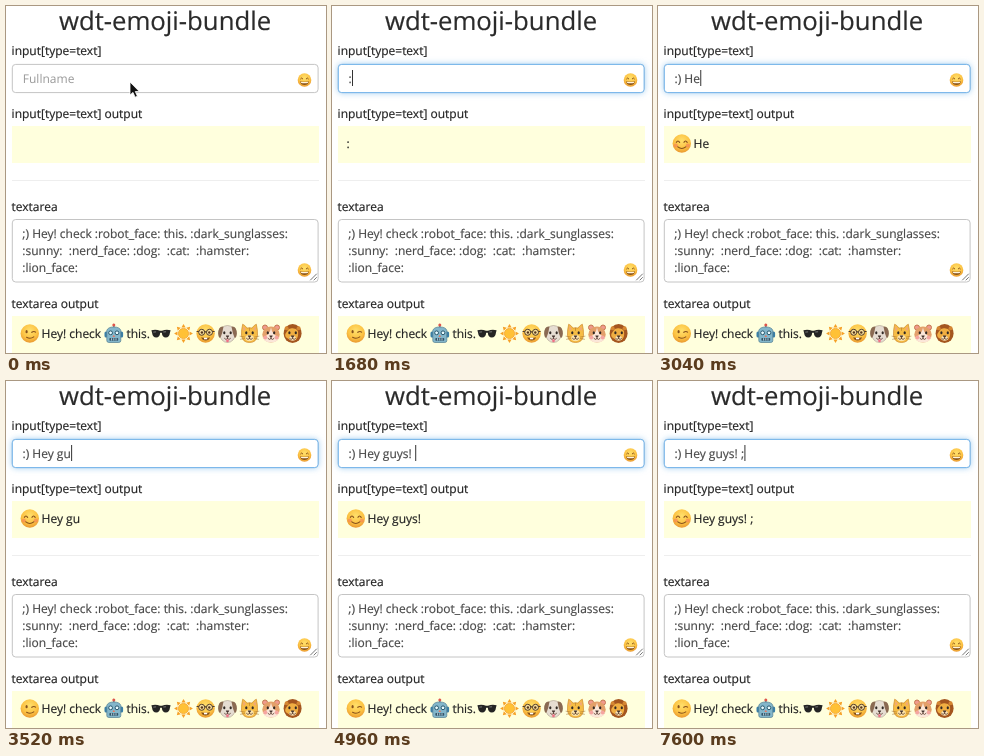
Recreate the animation shown at these times as an HTML page. Size 320 px wide and 347 px high, loop 8000 ms.

```html
<!DOCTYPE html>
<html lang="en">
<head>
<meta charset="utf-8">
<title>wdt-emoji-bundle</title>
<style>
  html, body { margin: 0; width: 100%; height: 100%; overflow: hidden; background: #fff; }
  svg { display: block; width: 100vw; height: 100vh; }
  text {
    font: 12px "Open Sans", sans-serif; text-rendering: geometricPrecision; white-space: pre;
    fill: #222; stroke: #222; stroke-width: .18px;
  }
  .title { font-size: 25.71px; fill: #2b2b2b; text-anchor: middle; }
  .field { fill: #fff; stroke: #c4c4c4; }
  .value { fill: #484848; stroke: #484848; }
  .line { fill: none; stroke-linecap: round; stroke-linejoin: round; }
  #placeholder { fill: #999; stroke: none; }
  #focus { fill: #fff; stroke: #74b4ea; filter: drop-shadow(0 0 3.4px rgba(102, 175, 233, .6)); }
</style>
</head>
<body>
<svg viewBox="0 0 320 347">
  <defs>
    <radialGradient id="skin" cx=".5" cy=".35" r=".7">
      <stop offset="0" stop-color="#ffe06c"/>
      <stop offset=".6" stop-color="#fcc243"/>
      <stop offset="1" stop-color="#e58f2c"/>
    </radialGradient>
    <!-- Emoji are centred on 0,0 and about 19 units wide -->
    <circle id="face" r="9.2" fill="url(#skin)"/>
    <g id="grin">
      <use href="#face"/>
      <path class="line" stroke="#8a5318" stroke-width="1.3" d="M-5.3-1.6q1.5-2.6 3 0M2.3-1.6q1.5-2.6 3 0"/>
      <path fill="#8a5318" d="M-6 1.6Q0 3 6 1.6Q5 6.8 0 6.8T-6 1.6Z"/>
      <path fill="#fff3dc" d="M-5.2 2.2Q0 3.4 5.2 2.2L4.4 4Q0 5-4.4 4Z"/>
    </g>
    <g id="blush">
      <use href="#face"/>
      <g fill="#f5795a" opacity=".55"><circle cx="-6" cy="2" r="2.1"/><circle cx="6" cy="2" r="2.1"/></g>
      <path class="line" stroke="#85501c" stroke-width="1.2" d="M-5.4-1.2q1.5-2.6 3.2 0M2.2-1.2q1.5-2.6 3.2 0M-4 3.4Q0 6.6 4 3.4"/>
    </g>
    <g id="wink">
      <use href="#face"/>
      <ellipse cx="-3.2" cy="-1.8" rx="1.1" ry="1.6" fill="#85501c"/>
      <path class="line" stroke="#85501c" stroke-width="1.1" d="M2-1.2Q4-2.8 5.8-1.4M-3.2 3.8Q.5 5.8 4 3.4"/>
    </g>
    <g id="robot">
      <path class="line" stroke="#5b8193" stroke-width="1.4" d="M0-9V-5"/>
      <circle cy="-8.4" r="1.5" fill="#e0554a"/>
      <rect x="-9.3" y="-2" width="18.6" height="6" rx="1.5" fill="#397ea6"/>
      <path fill="#83b6ca" stroke="#527f92" stroke-width=".7" d="M-7-3Q-6-6.5 0-6.5T7-3V7Q7 9 5 9H-5Q-7 9-7 7Z"/>
      <g fill="#e9fbff" stroke="#28576d"><circle cx="-3.2" cy="-.7" r="1.9"/><circle cx="3.2" cy="-.7" r="1.9"/></g>
      <path fill="#e57862" d="M0 1.2L1.3 3.4H-1.3Z"/>
      <rect x="-4.4" y="4.5" width="8.8" height="2.7" rx=".7" fill="#31546a"/>
      <path stroke="#d5edf3" stroke-width=".8" d="M-2.2 4.7v2.3M0 4.7v2.3M2.2 4.7v2.3"/>
    </g>
    <g id="shades">
      <path fill="#242424" d="M-9.6-3.2Q-5-4.3-1-2.7H1Q5-4.3 9.6-3.2L9-1Q8.4 4 4.8 4T.8-.7H-.8Q-1.2 4-4.8 4T-9-1Z"/>
      <path class="line" stroke="#777" d="M-7.3-1.4l2-.2M2.7-1.5l2-.2"/>
    </g>
    <g id="sun">
      <g id="rays" fill="#f6a026"></g>
      <circle r="5.1" fill="#ffc136" stroke="#f29a24" stroke-width=".7"/>
    </g>
    <g id="nerd">
      <use href="#face"/>
      <path fill="#85501c" d="M-4.4 3.8Q0 4.8 4.4 3.8Q3.4 7 0 7T-4.4 3.8Z"/>
      <path fill="#fff" d="M-1.6 4.2H1.6V5.8H-1.6Z"/>
      <g fill="#fbe3a0" stroke="#4f3a28"><circle cx="-3.9" cy="-1.2" r="3"/><circle cx="3.9" cy="-1.2" r="3"/></g>
      <path stroke="#4f3a28" stroke-width="1.2" d="M-9-2h2.2M6.8-2h2.2M-1-1.6h2"/>
      <g fill="#54351d"><circle cx="-3.7" cy="-1" r="1.2"/><circle cx="3.7" cy="-1" r="1.2"/></g>
    </g>
    <g id="eyes" fill="#302925"><ellipse cx="-3.2" cy="-.8" rx="1.1" ry="1.5"/><ellipse cx="3.2" cy="-.8" rx="1.1" ry="1.5"/></g>
    <g id="muzzle">
      <path class="line" stroke="#56382c" stroke-width=".8" d="M0 3V5M-3 5Q-1.5 7 0 5Q1.5 7 3 5"/>
      <path fill="#463631" d="M-1.7 2H1.7Q1.4 3.9 0 4Q-1.4 3.9-1.7 2Z"/>
    </g>
    <g id="dog">
      <ellipse cy=".5" rx="7.8" ry="8.5" fill="#e6ddd2" stroke="#a99b8b" stroke-width=".6"/>
      <path fill="#8a6a52" d="M-4-7Q-9-8-9.4 0Q-9 5-7 4Q-5 0-4-7ZM4-7Q9-8 9.4 0Q9 5 7 4Q5 0 4-7Z"/>
      <use href="#eyes"/><use href="#muzzle"/>
      <path fill="#ef7284" d="M-1.3 6H1.3V8Q0 9.4-1.3 8Z"/>
    </g>
    <g id="cat">
      <path fill="#f6bd45" stroke="#ce872b" stroke-width=".7" d="M-6.8-9.3Q-4-8-2.6-5.4Q0-6 2.6-5.4Q4-8 6.8-9.3Q8.2-4 8 2Q7 9 0 9T-8 2Q-8.2-4-6.8-9.3Z"/>
      <path fill="#f0a67c" d="M-6-7.2L-3.8-4.6L-6.4-2.6ZM6-7.2L3.8-4.6L6.4-2.6Z"/>
      <ellipse cy="4.5" rx="4.2" ry="3.1" fill="#fbe2a8"/>
      <use href="#eyes"/><use href="#muzzle"/>
      <path class="line" stroke="#9d6c2e" stroke-width=".5" d="M-5 3.5l-4.5-.8M-5 5l-4 .8M5 3.5l4.5-.8M5 5l4 .8M0-5.5v2.5"/>
    </g>
    <g id="hamster">
      <g fill="#f09a8c" stroke="#c57951"><circle cx="-6" cy="-6" r="2.5"/><circle cx="6" cy="-6" r="2.5"/></g>
      <ellipse cy="1" rx="8.7" ry="8" fill="#e3a06a"/>
      <path fill="#fbe6d8" d="M0-6Q1 1 8 4Q6.6 9 0 9T-8 4Q-1 1 0-6Z"/>
      <g fill="#f5a5a0"><circle cx="-5.7" cy="4" r="1.9"/><circle cx="5.7" cy="4" r="1.9"/></g>
      <use href="#eyes"/><use href="#muzzle"/>
    </g>
    <g id="lion">
      <ellipse rx="9" ry="9.4" fill="#a4561f"/>
      <g fill="#d58632"><circle cx="-6" cy="-5.3" r="2"/><circle cx="6" cy="-5.3" r="2"/></g>
      <path fill="#f0ae42" d="M-5.4-2.6Q-4-5.6 0-5.2T5.4-2.6Q6 3 4 5.4T-4 5.4T-5.4-2.6Z"/>
      <ellipse cy="4.8" rx="3.4" ry="2.4" fill="#fbe2b4"/>
      <use href="#eyes"/><use href="#muzzle"/>
    </g>
  </defs>

  <rect width="320" height="347" fill="#fff"/>
  <text class="title" x="159" y="24">wdt-emoji-bundle</text>
  <text x="5.6" y="49">input[type=text]</text>
  <text x="5.6" y="111.5">input[type=text] output</text>
  <text x="5.6" y="205">textarea</text>
  <text x="5.6" y="302">textarea output</text>
  <path stroke="#eee" d="M6 174.5H313"/>

  <rect class="field" x="6.3" y="58.4" width="305.8" height="28.2" rx="3.4"/>
  <rect id="focus" x="6.3" y="58.4" width="305.8" height="28.2" rx="3.4"/>
  <text id="placeholder" x="16.8" y="76.5">Fullname</text>
  <text id="value" class="value" x="16.5" y="76.5"></text>
  <rect id="caret" y="64" width="1" height="16" fill="#333"/>
  <use href="#grin" transform="translate(298.5 74) scale(.74)"/>

  <rect x="6" y="120" width="307" height="37" fill="#ffd"/>
  <use id="smile" href="#blush" x="23.8" y="137.5"/>
  <text id="output" y="142"></text>

  <rect class="field" x="6.3" y="213.5" width="305.8" height="62.5" rx="3.4"/>
  <text class="value" x="16.3" y="232">;) Hey! check :robot_face: this. :dark_sunglasses:</text>
  <text class="value" x="16.3" y="249">:sunny:  :nerd_face: :dog:  :cat:  :hamster:</text>
  <text class="value" x="16.3" y="266">:lion_face:</text>
  <path class="line" stroke="#555" stroke-width=".8" d="M304.5 274l6-6M308 274l2.5-2.5"/>
  <use href="#grin" transform="translate(298.5 264) scale(.74)"/>

  <rect x="6" y="310" width="307" height="37" fill="#ffd"/>
  <text x="35.6" y="331.5">Hey! check</text>
  <text x="120.4" y="331.5">this.</text>
  <g id="row"></g>

  <path id="arrow" fill="#111" stroke="#fff" stroke-width=".8" d="M124 76v13l3-2.6 2.1 4.8 2.3-1-2.1-4.7h4Z"/>
  <path id="beam" class="line" stroke="#222" stroke-width="1.2" d="M132 68.5q2.6 0 2.6 2v9q0 2-2.6 2M137.2 68.5q-2.6 0-2.6 2M134.6 79.5q0 2 2.6 2M133.2 76.5h2.8"/>
</svg>
<script>
  const LOOP = 8000, FOCUS = 1000, BLINK = 400;
  const el = id => document.getElementById(id);
  const show = (id, visible) => { el(id).style.display = visible ? "" : "none"; };

  // Each edit: time, then the whole text of the field
  const edits = [
    [0, ""], [1600, ":"], [2000, ":)"], [2240, ":) "],
    [2960, ":) H"], [3040, ":) He"], [3200, ":) Hey"],
    [3360, ":) Hey "], [3440, ":) Hey g"], [3520, ":) Hey gu"],
    [3600, ":) Hey guy"], [3920, ":) Hey guys"], [4240, ":) Hey guys!"],
    [4720, ":) Hey guys! "], [5680, ":) Hey guys! :"],
    [7280, ":) Hey guys! "], [7600, ":) Hey guys! ;"]
  ];

  const emoji = { wink: 23.8, robot: 107.8, shades: 155, sun: 177.5, nerd: 199.6, dog: 221.5, cat: 243.5, hamster: 265, lion: 286.6 };
  el("row").innerHTML = Object.entries(emoji)
    .map(([name, x]) => `<use href="#${name}" x="${x}" y="327.5"/>`).join("");
  el("rays").innerHTML = Array.from({ length: 8 }, (_, i) =>
    `<path d="M-2.1-6H2.1L0-9.4Z" transform="rotate(${i * 45})"/>`).join("");

  function render(t) {
    const [since, text] = edits.findLast(([time]) => time <= t);
    const hasSmile = text.startsWith(":)");
    const idle = Math.floor((t - since) / BLINK);

    show("arrow", t < 720);
    show("beam", t >= 720 && t < 1600);
    show("placeholder", !text);
    el("focus").style.opacity = Math.min(1, Math.max(0, (t - FOCUS) / 160));

    el("value").textContent = text;
    el("caret").setAttribute("x", 16.8 + el("value").getComputedTextLength());
    show("caret", t >= 1040 && (!text || idle % 2 === 0));

    show("smile", hasSmile);
    el("output").setAttribute("x", hasSmile ? 35.6 : 14.6);
    el("output").textContent = hasSmile ? text.slice(3) : text;
  }

  function tick() {
    render(performance.now() % LOOP);
    requestAnimationFrame(tick);
  }
  tick();
</script>
</body>
</html>
```
